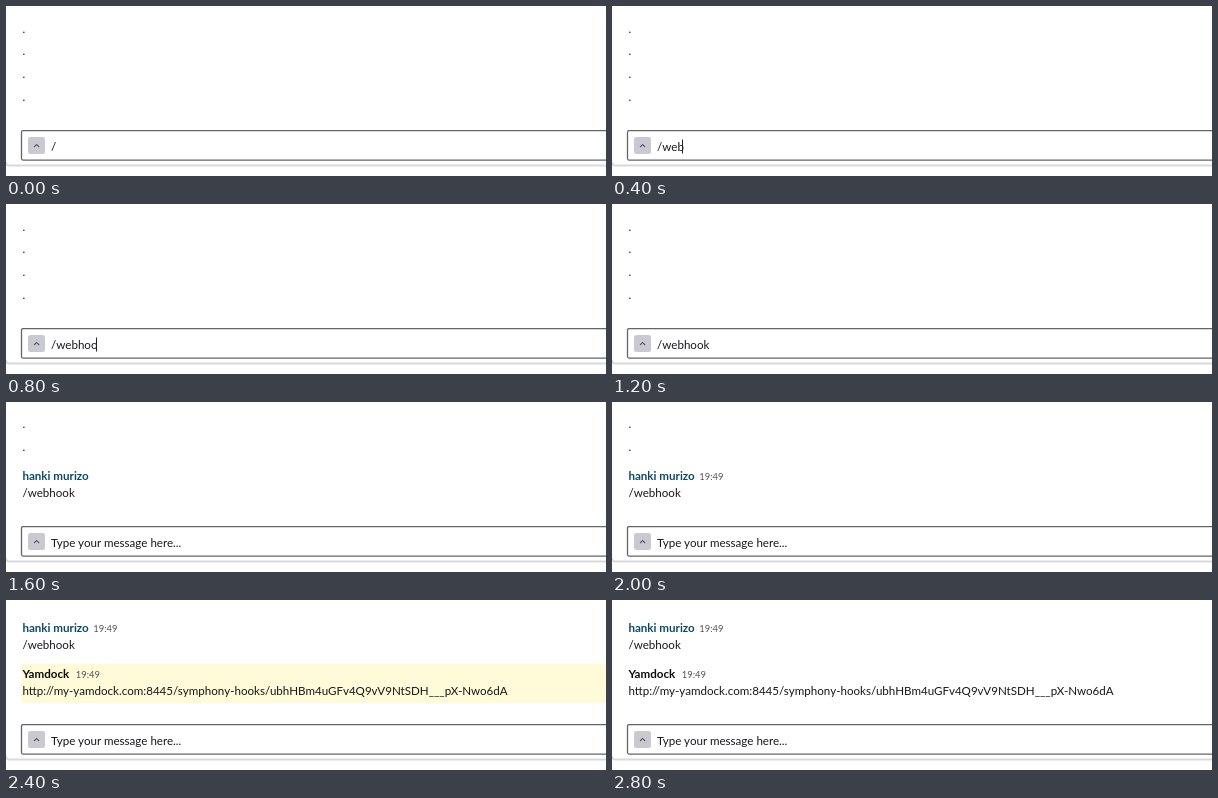
Recreate the animation shown at these times as an HTML page. Size 600 px wide and 170 px high, loop 3.6 s.

```html
<!DOCTYPE html>
<html lang="en">
<head>
<meta charset="utf-8">
<title>Chat webhook command</title>
<style>
  html, body { margin: 0; width: 100%; height: 100%; overflow: hidden; background: #fff; }
  svg { display: block; width: 600px; height: 170px; }
  text { font: 400 11.6px Lato, sans-serif; fill: #16181c; white-space: pre; }
  .user { font-weight: 700; fill: #0b4a66; }
  .bot { font-weight: 700; fill: #0c0d10; }
  .time { font-size: 9.4px; fill: #50545c; }
</style>
</head>
<body>
<svg viewBox="0 0 600 170">
  <g id="log"></g>
  <path d="M0 156 Q0 159.5 3 159.5 H600" fill="none" stroke="#d9d9dc" stroke-width="1.8"/>
  <rect x="15.5" y="124.7" width="620" height="29.4" rx="1.5" fill="#fff" stroke="#62656d" stroke-width="1.3"/>
  <rect x="22" y="131" width="17" height="17" rx="2.5" fill="#c9c9d1"/>
  <path d="M28 141 L30.6 138.5 L33.2 141" fill="none" stroke="#5c5e68" stroke-width="1.1"/>
  <text id="draft" x="45" y="145"></text>
  <rect id="caret" y="133.5" width="1" height="14" fill="#222"/>
</svg>
<script>
const LOOP = 3600;
const PROMPT = "Type your message here...";
const URL_TEXT = "http://my-yamdock.com:8445/symphony-hooks/ubhHBm4uGFv4Q9vV9NtSDH___pX-Nwo6dA";

const label = (x, y, text, kind = "") => `<text x="${x}" y="${y}" class="${kind}">${text}</text>`;
const dots = (...rows) => rows.map(y => label(16.4, y, ".")).join("");

function message(y, kind, name, timeX, body, showTime = true) {
  return label(16.4, y, name, kind)
    + (showTime ? label(timeX, y, "19:49", "time") : "")
    + label(16.4, y + 17, body);
}
const command = (y, showTime) => message(y, "user", "hanki murizo", 87.3, "/webhook", showTime);
const reply = () => message(78, "bot", "Yamdock", 69.8, URL_TEXT);
const highlight = '<rect x="15.5" y="63.5" width="585" height="39.5" fill="#fffbd8"/>';

const idle = dots(27, 49, 72, 94.5);
const sent = showTime => dots(26, 48.5) + command(78, showTime);

const steps = [
  { at: 0,    log: idle, draft: "/" },
  { at: 400,  log: idle, draft: "/web", caretX: 70 },
  { at: 800,  log: idle, draft: "/webhoo", caretX: 90 },
  { at: 1200, log: idle, draft: "/webhook" },
  { at: 1600, log: sent(false), draft: PROMPT },
  { at: 2000, log: sent(true), draft: PROMPT },
  { at: 2400, log: command(32) + highlight + reply(), draft: PROMPT },
  { at: 2800, log: command(32) + reply(), draft: PROMPT },
];

const [log, draft, caret] = ["log", "draft", "caret"].map(id => document.getElementById(id));
let shown;

function show(step) {
  if (step === shown) return;
  shown = step;
  log.innerHTML = step.log;
  draft.textContent = step.draft;
  caret.setAttribute("visibility", step.caretX ? "visible" : "hidden");
  caret.setAttribute("x", step.caretX || 0);
}

const start = performance.now();
function tick() {
  const t = (performance.now() - start) % LOOP;
  show(steps.findLast(step => step.at <= t));
  requestAnimationFrame(tick);
}
tick();
</script>
</body>
</html>
```
